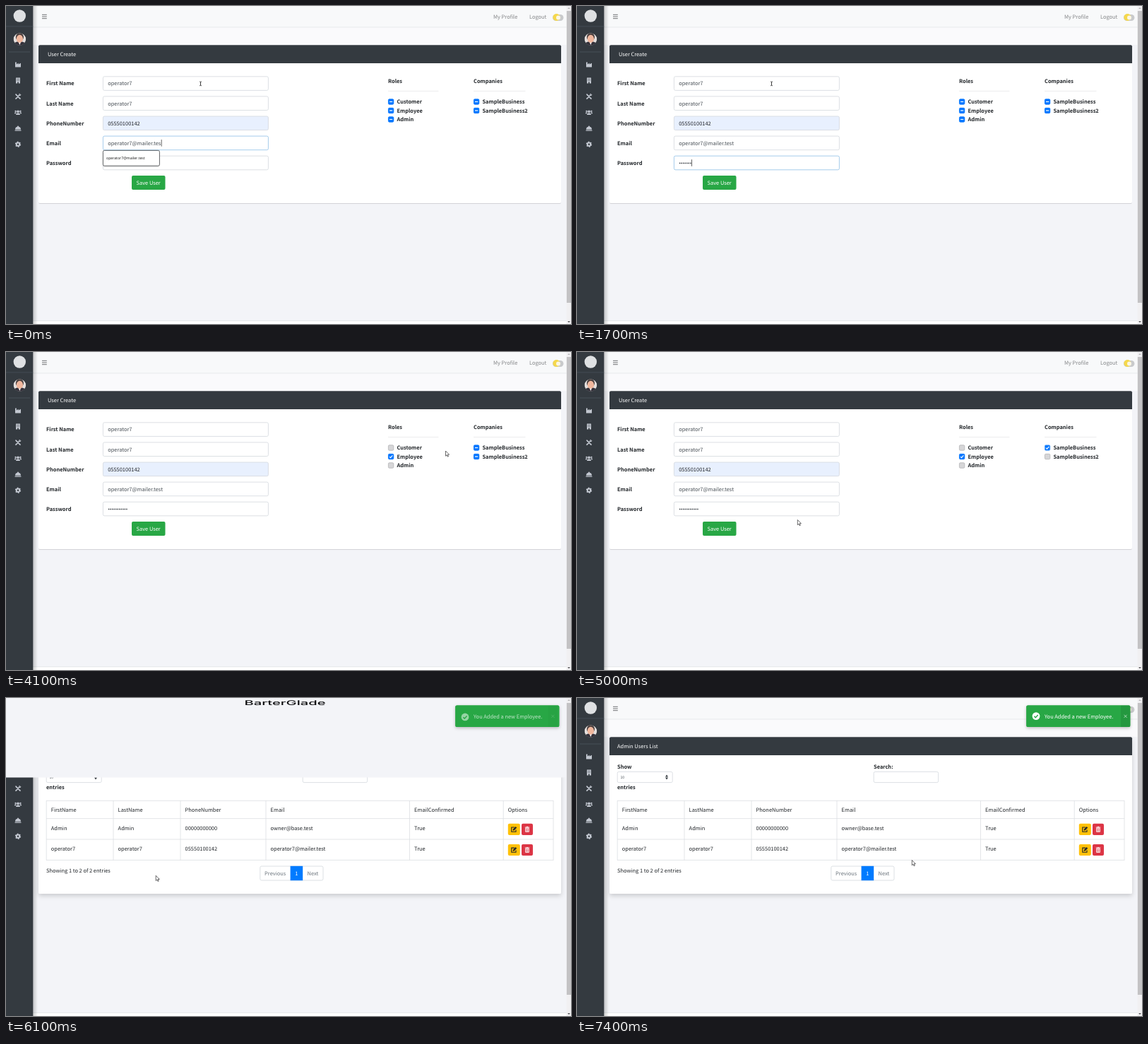
An HTML page for the animation above (7500 ms loop, 800x450 px).

```html
<!DOCTYPE html>
<html lang="en">
<head>
<meta charset="utf-8">
<title>User create</title>
<style>
  html, body { margin: 0; width: 100%; height: 100%; overflow: hidden; background: #f3f4f8; }
  svg { display: block; width: 100vw; height: 100vh; }
  text {
    font: 7.46px "Noto Sans CJK JP", "Noto Sans CJK SC", "Noto Sans CJK", "Open Sans", sans-serif;
    fill: #212529; text-rendering: geometricPrecision; white-space: pre;
  }
  .b { font-weight: 700; }
  .w { fill: #fff; }
  .in { fill: #495057; }
  .dim { fill: #858789; }
  .muted { fill: #6c757d; }
  .mid { text-anchor: middle; }
  .hint { font: 5.2px "Open Sans", "Noto Sans", sans-serif; fill: #111; }
  .tiny { font-size: 5.2px; fill: #495057; }
  .brand { font: 500 20.2px Inter, Roboto, sans-serif; fill: #0c0c0e; }
  .icon { fill: #c2c7d0; }
</style>
</head>
<body>
<svg id="stage" viewBox="0 0 800 450" preserveAspectRatio="none"></svg>
<script>
const LOOP = 7500, STEP = 100;
const USER = 'operator7', PHONE = '05550100142', MAIL = USER + '@mailer.test';
const ROLES = ['Customer', 'Employee', 'Admin'];
const FIRMS = ['SampleBusiness', 'SampleBusiness2'];

// Markup helpers
const text = (x, y, s, cls = '', extra = '') => `<text x="${x}" y="${y}" class="${cls}" ${extra}>${s}</text>`;
const rect = (x, y, w, h, fill, extra = '') => `<rect x="${x}" y="${y}" width="${w}" height="${h}" fill="${fill}" ${extra}/>`;
const box = (x, y, w, h, id = '', fill = '#fff') =>
  rect(x, y, w, h, fill, `rx="2" stroke="#d3d8dd" stroke-width=".8" ${id && `id="${id}"`}`);
const line = (x1, y1, x2, y2, color, w = .7) =>
  `<path d="M${x1} ${y1}L${x2} ${y2}" stroke="${color}" stroke-width="${w}" fill="none"/>`;
const at = (x, y, body, extra = '') => `<g transform="translate(${x} ${y})" ${extra}>${body}</g>`;

function sidebar() {
  const icons = [
    '<path d="M-4 3.6V-3.4h1.8V-.4L.6-2.2V-.4L4-2.2V3.6z"/>',
    '<path d="M-3 4V-4H3V4H.8V2H-.8V4z"/>' + [-2.6, -.7].map(y =>
      rect(-1.7, y, 1.1, 1, '#343a40') + rect(.6, y, 1.1, 1, '#343a40')).join(''),
    '<path d="M-3-3L3 3M-3 3L2.6-2.6" stroke="#c2c7d0" stroke-width="1.7" stroke-linecap="round"/>' +
      '<circle cx="2.6" cy="-2.6" r="1.6"/><path d="M2.4-2.4L4.4-4.4" stroke="#343a40"/>',
    '<circle cx="-3.4" cy="-1.8" r="1.2"/><circle cx="3.4" cy="-1.8" r="1.2"/><circle cy="-1.3" r="1.8"/>' +
      '<path d="M-5.2 1.7q0-2 2-2h1l-1 2zM5.2 1.7q0-2-2-2h-1l1 2zM-3 3.4q0-2.6 2-2.6h2q2 0 2 2.6z"/>',
    '<path d="M-4 1.6a4 4 0 0 1 8 0zM-4.4 2.2h8.8v1.3h-8.8zM-1-3.4h2v.9h-2z"/>',
    '<circle r="2.2" fill="none" stroke="#c2c7d0" stroke-width="2"/>' +
      '<circle r="3.5" fill="none" stroke="#c2c7d0" stroke-width="1.3" stroke-dasharray="1.85 1.815"/>'
  ];
  const avatar = '<g clip-path="url(#face)"><circle r="9" fill="#e4dfdd"/>' +
    '<path d="M-9 9q1-6 9-6t9 6z" fill="#35323b"/><path d="M-2.4 2.5L0 8l2.4-5.5z" fill="#fff"/>' +
    '<ellipse cy="-3" rx="5.6" ry="6" fill="#4b4140"/><ellipse cy="-.6" rx="4.6" ry="5.6" fill="#f0b79d"/></g>';
  return rect(38, 0, 7, 450, 'url(#side)') + rect(0, 0, 38.3, 450, '#343a40') +
    '<circle cx="19.3" cy="14" r="8.7" fill="#dfe1e3"/>' +
    line(0, 28.9, 38.3, 28.9, '#4b545c') + at(19.4, 47, avatar) + line(4, 65, 34, 65, '#4f5962') +
    icons.map((s, i) => at(17, 83 + i * 22.55, s, 'class="icon"')).join('');
}

function frame() {
  const burger = [12.3, 15, 17.7].map(y => line(51, y, 57.8, y, '#6f7173', 1)).join('');
  return rect(0, 0, 800, 450, '#f3f4f8') + rect(38, 30, 756, 25, '#fafafc') +
    rect(38, 0, 756, 30, '#f8f9fa') + line(38, 30, 794, 30, '#dee2e6') + burger +
    text(690, 17.5, 'My Profile', 'dim') + text(741, 17.5, 'Logout', 'dim') +
    rect(774, 12, 15.4, 9, '#c9cacc', 'rx="4.5"') +
    '<circle cx="779.4" cy="16" r="5" fill="#f5d84c"/><circle cx="782" cy="16.6" r="3" fill="#fbf7e6"/>' +
    rect(38, 445.5, 756, 5, '#fff') + line(38, 445.5, 794, 445.5, '#dee2e6') + sidebar();
}

const card = (title, x, bottom, shadow) =>
  rect(46, 55.3, 740, bottom - 55.3, '#fff', `rx="2" filter="url(#${shadow})"`) +
  '<path d="M46 81V57.3q0-2 2-2H784q2 0 2 2V81z" fill="#343a40"/>' + text(x, 71, title, 'w');

function checkbox(x, y, name) {
  return at(x, y, rect(.4, -3.6, 7.4, 7.4, '#0075ff', 'rx="1.4" stroke-width=".8"') +
    '<path fill="none" stroke="#fff" stroke-width="1.2"/>', `class="check" data-name="${name}"`);
}

function checkList(x, title, width, names) {
  return text(x, 108.6, title, 'b') + line(x, 120.4, x + width, 120.4, '#e4e4e6') +
    names.map((n, i) => checkbox(x, 135.4 + i * 12.5, n) + text(x + 12.4, 138.1 + i * 12.5, n, 'b')).join('');
}

function formPage() {
  const rows = [['First Name', USER], ['Last Name', USER], ['PhoneNumber', PHONE], ['Email', ''], ['Password', '']];
  const fields = rows.map(([label, value], i) => {
    const y = 109.6 + i * 28.1, phone = i === 2;
    return text(57, y + 2.8, label, 'b') + box(137.4, y - 9.8, 234, 19.6, 'field' + i, phone ? '#e8f0fe' : '#fff') +
      text(144.2, y + 2.8, value, phone ? '' : 'in', `id="value${i}"`);
  }).join('');
  return card('User Create', 59, 279, 'low') + fields + '<g id="dots"></g>' +
    rect(0, 0, .7, 9.6, '#222', 'id="caret"') +
    rect(178, 240, 47.5, 20, '#28a745', 'rx="2" id="save"') + text(201.7, 252.8, 'Save User', 'w mid') +
    checkList(541, 'Roles', 71.5, ROLES) + checkList(662, 'Companies', 73.5, FIRMS) +
    '<g id="popup">' + rect(137.4, 204.4, 80, 21.8, '#fff', 'rx="2" stroke="#55575a" stroke-width=".9" filter="url(#low)"') +
    text(142, 217.2, MAIL, 'hint') + '</g>';
}

function listPage() {
  const cols = [57.2, 152, 247, 368, 571.5, 704.2, 775];
  const rows = [
    ['FirstName', 'LastName', 'PhoneNumber', 'Email', 'EmailConfirmed', 'Options'],
    ['Admin', 'Admin', '00000000000', 'owner@base.test', 'True'],
    [USER, USER, PHONE, MAIL, 'True']
  ];
  const base = [160.8, 186.8, 215.8], grid = '#dcdfe3';
  const cells = rows.map((r, i) => r.map((s, j) => text(cols[j] + 6.6, base[i], s)).join('')).join('');
  const edit = '<path d="M1-2.8H-3.4V3.4H2.8V.6" fill="none" stroke="#212529" stroke-width="1.1"/>' +
    '<path d="M-1.4 1.6V0L2.4-3.8L4-2.2L.2 1.6z" fill="#212529"/>';
  const bin = '<path d="M-3.2-3.4h2L-.6-4H.6l.6.6h2v1h-6.4z" fill="#fff"/>' +
    '<path d="M-2.4-1.6H2.4V3.5H-2.4zM-.8-1.2V3.2M.8-1.2V3.2" fill="none" stroke="#fff" stroke-width=".9"/>';
  const tools = [185.8, 214.9].map(y =>
    rect(710.8, y - 8, 17, 16.2, '#ffc107', 'rx="2"') + at(719.2, y, edit) +
    rect(730, y - 8, 16, 16.2, '#dc3545', 'rx="2"') + at(738, y, bin)).join('');
  return card('Admin Users List', 57, 277, 'high') +
    text(57, 100.4, 'Show', 'b') + box(57.2, 104.4, 78, 15.2) + text(61.4, 113.9, '10', 'tiny') +
    '<path d="M125 111.4l2-2.8 2 2.8zM125 112.6l2 2.8 2-2.8z" fill="#343a40"/>' +
    text(57, 129.2, 'entries', 'b') + text(420, 100.4, 'Search:', 'b') + box(420.2, 104.4, 91.4, 15.2) +
    [145.4, 170.6, 200, 229.4].map(y => line(57, y, 775.2, y, grid, .8)).join('') +
    cols.map(x => line(x, 145.2, x, 229.6, grid, .8)).join('') + cells + tools +
    text(57, 247.2, 'Showing 1 to 2 of 2 entries') +
    box(359.8, 238, 89.2, 20) + rect(402.6, 237.8, 17.6, 20.4, '#007bff') +
    text(381.2, 251, 'Previous', 'muted mid') + text(411.4, 251, '1', 'w mid') + text(434.4, 251, 'Next', 'muted mid');
}

const toast = () =>
  rect(636.3, 10.6, 147, 30.4, '#28a745', 'rx="2" filter="url(#float)" id="toastShade"') +
  '<g clip-path="url(#toastClip)"><circle id="ripple" fill="#28a745"/></g>' +
  '<g id="tick"><circle cx="650" cy="25.6" r="5.4" fill="#fff"/>' +
  '<path d="M647.4 25.8l1.9 1.9 3.4-3.7" fill="none" stroke="#28a745" stroke-width="1.4"/></g>' +
  text(662, 28.5, 'You Added a new Employee.', 'w', 'id="note"') +
  '<g id="dismiss">' + rect(770, 10.6, 13.3, 30.4, '#000', 'opacity=".09"') +
  '<path d="M774.6 23.8l4 4m0-4l-4 4" stroke="#b9e3c3" stroke-width=".9"/></g>';

const shadow = (id, dy, blur, alpha) =>
  `<filter id="${id}" x="-10%" y="-30%" width="120%" height="170%"><feDropShadow dx="0" dy="${dy}" stdDeviation="${blur}" flood-opacity="${alpha}"/></filter>`;

document.getElementById('stage').innerHTML =
  '<defs>' + shadow('low', .6, .7, .22) + shadow('high', 3, 3.4, .17) + shadow('float', 1.6, 1.9, .25) +
  '<linearGradient id="side"><stop stop-color="#000" stop-opacity=".2"/><stop offset="1" stop-color="#000" stop-opacity="0"/></linearGradient>' +
  '<clipPath id="face"><circle r="8.8"/></clipPath>' +
  '<clipPath id="toastClip">' + rect(636.3, 10.6, 147, 30.4, '#000', 'rx="2"') + '</clipPath></defs>' +
  frame() + `<g id="form">${formPage()}</g><g id="list">${listPage()}</g>` +
  '<g id="loader">' + rect(0, 0, 794, 450, '#f3f4f8') +
  text(0, 0, 'BarterGlade', 'brand mid', 'transform="translate(395 41) scale(1 1.84)"') + '</g>' +
  rect(793.6, 0, 6.4, 450, '#f1f0f2') + rect(793.9, 7, 6.1, 413, '#c3c2c4', 'id="thumb"') +
  '<path d="M795.2 4l1.8-2 1.8 2z" fill="#b5b5b7"/><path d="M795.2 446l1.8 2 1.8-2z" fill="#4a4a4c"/>' +
  `<g id="toast">${toast()}</g>` +
  '<path id="beam" d="M274 107q1.5 0 1.5.8V112q0 .8-1.5.8M277 107q-1.5 0-1.5.8V112q0 .8 1.5.8" fill="none" stroke="#333" stroke-width=".8"/>' +
  '<path id="arrow" d="M0 0V7.2L1.7 5.7L2.8 8.2L4 7.7L2.9 5.2H5.1z" fill="#fff" stroke="#2b2b2d" stroke-width=".7"/>';

const $ = id => document.getElementById(id);
const set = (id, attrs) => { for (const k in attrs) $(id).setAttribute(k, attrs[k]); };
const show = (id, on) => set(id, { visibility: on ? 'visible' : 'hidden' });
const part = (t, from, length) => Math.min(1, Math.max(0, (t - from) / length));
const easeOut = p => 1 - (1 - p) ** 2;

// Pointer tip: time, x, y
const PATH = [
  [2700, 275, 110], [2800, 300, 112], [3000, 450, 119], [3100, 522, 122], [3200, 552.5, 124], [3300, 550, 136],
  [3500, 546, 146], [3800, 546, 146], [4000, 590, 143], [4200, 655, 137], [4300, 667, 135], [4500, 667, 135],
  [4600, 655, 140], [4700, 590, 163], [4800, 490, 196], [4900, 390, 223], [5000, 312.3, 237.5], [5100, 255, 247],
  [5200, 222, 251], [5300, 212.2, 251.3], [7000, 212.2, 251.3], [7100, 245, 249], [7200, 330, 242],
  [7300, 425, 233], [7400, 474.3, 229.5], [7500, 474.3, 229.5]
];

function pointer(t) {
  const i = Math.max(1, PATH.findIndex(p => p[0] >= t));
  const [a, b] = [PATH[i - 1], PATH[i]], k = part(t, a[0], b[0] - a[0]);
  return [a[1] + (b[1] - a[1]) * k, a[2] + (b[2] - a[2]) * k];
}

function dotCount(t) {
  if (t < 1100) return 0;
  if (t < 2300) return Math.min(7, Math.floor((t - 1000) / 100));
  return t < 2400 ? 9 : t < 2600 ? 10 : 11;
}

function drawChecks(t) {
  for (const el of document.querySelectorAll('.check')) {
    const name = el.dataset.name, firm = FIRMS.includes(name);
    const mixed = t < (firm ? 4400 : 3600);
    const on = name === ROLES[1] || name === FIRMS[0];
    const [square, mark] = el.children, blue = mixed || on;
    square.setAttribute('fill', blue ? '#0075ff' : '#d6d6d8');
    square.setAttribute('stroke', !blue ? '#b4b4b6' : !mixed && name === FIRMS[0] ? '#69a9f5' : '#0075ff');
    mark.setAttribute('d', mixed ? 'M2 .1H6.2' : on ? 'M2 .2L3.5 1.7L6.3-1.5' : '');
  }
}

function drawForm(t) {
  const inMail = t < 300, inPass = t >= 300 && t < 3600, n = dotCount(t);
  $('value3').textContent = t < 100 ? MAIL.slice(0, -1) : MAIL;
  show('popup', t < 200);
  set('field3', { stroke: inMail ? '#8fbfe6' : '#d3d8dd' });
  set('field4', { stroke: inPass ? (t < 400 ? '#aecbe4' : '#8fbfe6') : '#d3d8dd' });
  $('dots').innerHTML = Array.from({ length: n }, (_, i) =>
    `<circle cx="${145.6 + i * 2.53}" cy="222.4" r=".85" fill="#40464c"/>`).join('');
  const lit = inMail || (inPass && t < 3100 && !(t >= 800 && t < 1100));
  const x = inMail ? 144.6 + $('value3').getComputedTextLength() : 144.3 + n * 2.53;
  set('caret', { x, y: inMail ? 189.1 : 217.2, opacity: lit ? 1 : 0 });
  set('save', { fill: t >= 5200 ? (t >= 5400 ? '#1e7e34' : '#218838') : '#28a745' });
  drawChecks(t);
}

function drawToast(t) {
  const e = t - 5710;
  $('toast').style.display = e > 0 ? '' : 'none';
  if (e <= 0) return;
  const rise = (id, delay, shift, axis) => {
    const p = easeOut(part(e, delay, 300)), d = shift * (1 - p);
    set(id, { opacity: p, transform: axis === 'x' ? `translate(${d} 0)` : `translate(0 ${d})` });
  };
  rise('toast', 0, 7.6);
  rise('tick', 300, 2.8);
  rise('note', 250, 3);
  rise('dismiss', 350, -3, 'x');
  const s = easeOut(part(e, 0, 400));
  set('ripple', { cx: 783.3 - 77 * s, cy: 219 - 162 * s, r: 104 * s });
  set('toastShade', { opacity: s });
}

function render(t) {
  const loading = t >= 5600, ready = t >= 5900;
  $('form').style.display = loading ? 'none' : '';
  $('list').style.display = ready ? '' : 'none';
  if (!loading) drawForm(t);
  const fold = 1 - part(t, 5950, 200);
  $('loader').style.display = loading && fold > 0 ? '' : 'none';
  set('loader', { transform: `scale(1 ${fold})` });
  set('thumb', { height: loading && !ready ? 142 : 413 });
  drawToast(t);
  const [x, y] = pointer(t);
  show('beam', t < 2800);
  show('arrow', t >= 2800);
  set('arrow', { transform: `translate(${x} ${y})` });
}

const start = performance.now();
let shown = -1;
function tick() {
  const t = Math.floor((performance.now() - start) % LOOP / STEP) * STEP;
  if (t !== shown) render(shown = t);
  requestAnimationFrame(tick);
}
tick();
</script>
</body>
</html>
```
